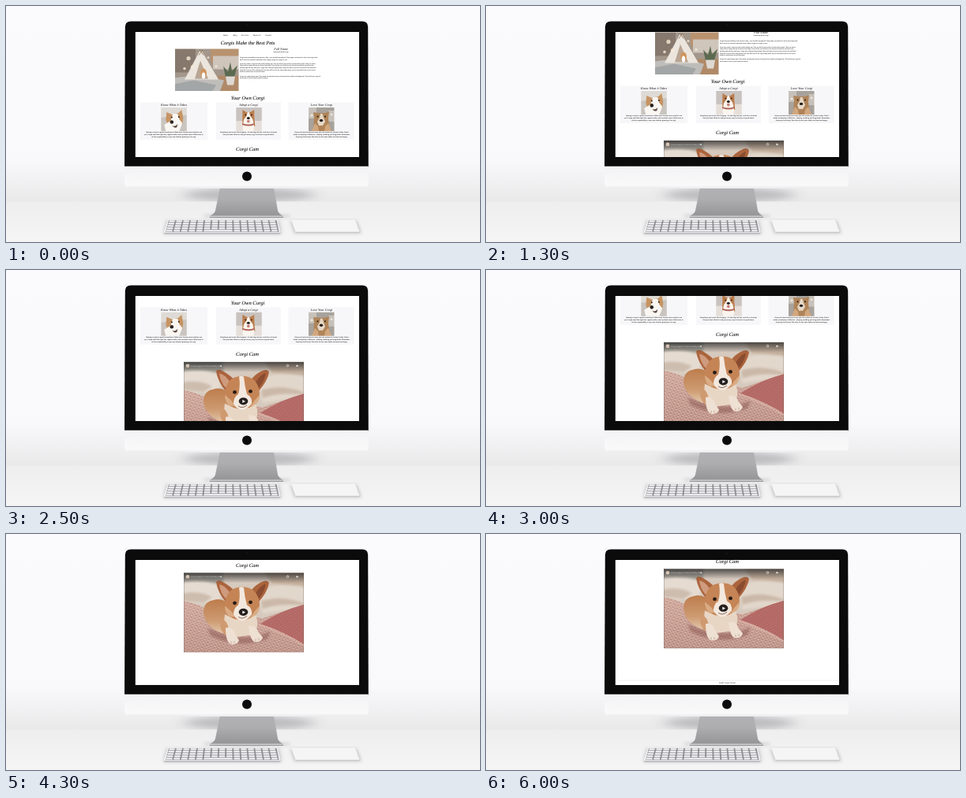
An HTML page that plays this animation: 600x300 px, repeating every 6100 ms.

```html
<!DOCTYPE html>
<html lang="en">
<head>
<meta charset="utf-8">
<title>Corgi page on a desktop screen</title>
<style>
html, body { margin: 0; width: 100%; height: 100%; overflow: hidden; background: #f8f8f9; }
svg { display: block; width: 600px; height: 300px; }
text { text-anchor: middle; text-rendering: geometricPrecision; fill: #151515; }
.serif { font-family: "Liberation Serif", serif; font-style: italic; }
.sans { font-family: "Open Sans", sans-serif; font-size: 1.75px; font-weight: 600; }
.card { font-size: 1.95px; }
.left { text-anchor: start; }
.h1 { font-size: 6.5px; stroke: #151515; stroke-width: .08px; }
.h2 { font-size: 4.15px; }
.nav { font-size: 2.6px; }
</style>
</head>
<body>
<svg viewBox="0 0 600 300" xmlns="http://www.w3.org/2000/svg">
  <defs>
    <linearGradient id="wall" x2="0" y2="1">
      <stop stop-color="#fbfafc"/><stop offset=".78" stop-color="#f9f8fa"/><stop offset="1" stop-color="#e9e9ea"/>
    </linearGradient>
    <linearGradient id="desk" x2="0" y2="1">
      <stop stop-color="#eeeeef"/><stop offset=".4" stop-color="#f1f1f2"/><stop offset="1" stop-color="#f5f5f6"/>
    </linearGradient>
    <linearGradient id="chin" x2="0" y2="1">
      <stop stop-color="#f3f3f5"/><stop offset=".85" stop-color="#f9f9fa"/><stop offset="1" stop-color="#eaeaec"/>
    </linearGradient>
    <linearGradient id="stand" x2="0" y2="1">
      <stop stop-color="#b2b2b4"/><stop offset=".4" stop-color="#adadb0"/><stop offset="1" stop-color="#939396"/>
    </linearGradient>
    <linearGradient id="bar" x2="0" y2="1">
      <stop stop-color="#2b2b2b" stop-opacity=".8"/><stop offset="1" stop-color="#2b2b2b" stop-opacity="0"/>
    </linearGradient>
    <linearGradient id="knit" x2="0" y2="1">
      <stop stop-color="#d3a99d"/><stop offset="1" stop-color="#b78a7f"/>
    </linearGradient>
    <linearGradient id="coat" x2="0" y2="1">
      <stop stop-color="#bd7d4d"/><stop offset=".6" stop-color="#cd9a70"/><stop offset="1" stop-color="#e3c7ac"/>
    </linearGradient>
    <pattern id="weave" width="5" height="4" patternUnits="userSpaceOnUse" patternTransform="rotate(18)">
      <path d="M0 1h3M2.5 3h2.5" stroke="#ead0c5" stroke-width="1"/>
      <path d="M0 2.2h3M2.5 4h2.5" stroke="#96645c" stroke-width=".5"/>
    </pattern>
    <pattern id="rib" width="3" height="3" patternUnits="userSpaceOnUse" patternTransform="rotate(-28)">
      <path d="M0 1h2" stroke="#c98581" stroke-width=".8"/>
    </pattern>
    <filter id="photo"><feGaussianBlur stdDeviation=".4"/></filter>
    <filter id="soft"><feGaussianBlur stdDeviation="1.6"/></filter>
    <filter id="blur" x="-30%" width="160%" y="-100%" height="300%"><feGaussianBlur stdDeviation="2"/></filter>
    <filter id="haze" x="-40%" width="180%" y="-150%" height="400%"><feGaussianBlur stdDeviation="10 4"/></filter>
    <clipPath id="wallBox"><path d="M0 0H600V248.5H0Z"/></clipPath>
    <clipPath id="screen"><path d="M163.8 33H447V192H163.8Z"/></clipPath>
    <clipPath id="heroBox"><path d="M0 0H80.5V53.5H0Z"/></clipPath>
    <clipPath id="thumb"><path d="M0 0H32.5V30H0Z"/></clipPath>
    <clipPath id="videoBox"><path d="M0 0H152V101H0Z"/></clipPath>
  </defs>

  <!-- Room -->
  <path fill="url(#wall)" d="M0 0H600V249H0Z"/>
  <path fill="url(#desk)" d="M0 248.5H600V300H0Z"/>
  <g clip-path="url(#wallBox)">
    <ellipse cx="308" cy="240" rx="82" ry="9" fill="#a3a3a6" opacity=".65" filter="url(#haze)"/>
  </g>
  <ellipse cx="305" cy="267" rx="56" ry="3" fill="#b5b5b8" opacity=".6" filter="url(#blur)"/>

  <!-- Computer -->
  <path fill="url(#stand)" d="M271 231H339L344 260Q345 264 351 267V268.5H258V267Q264 264 265 260Z"/>
  <path fill="#d9d9db" d="M258.5 266.8H350.5L351 268H258Z"/>
  <path fill="#8c8c8f" d="M258 268H351V269H258Z"/>
  <path fill="#0b0b0c" d="M158 19.6H451Q458 19.6 458.2 26.5L458.8 205H150L150.8 26.5Q151 19.6 158 19.6Z"/>
  <circle cx="304.5" cy="24.5" r=".7" fill="#2c2c30"/>
  <path fill="url(#chin)" d="M150 203.8H458.8V226Q458.8 232 453 232H156Q150 232 150 226Z"/>
  <circle cx="305" cy="216.5" r="6" fill="#0b0b0c"/>

  <!-- Keyboard and trackpad -->
  <path fill="#a9a9ad" opacity=".6" filter="url(#blur)" d="M203 273H346L349 290H199ZM360 273H444L450 289H365Z"/>
  <path fill="#b5b5b9" d="M205 271.5H343.5L347.5 289Q347.5 290 346 290H201.5Q200 290 200 289Z"/>
  <path fill="#f1f1f2" d="M205 271H343.5L347.5 287.5Q347.5 288.5 346 288.5H201.5Q200 288.5 200 287.5Z"/>
  <path fill="#8d8d92" d="M206 272.2H342.5L345.6 287.2H202.2Z"/>
  <g id="keys" fill="#fcfcfd"></g>
  <path fill="#cdcdd0" d="M361 272.5H442L448 288.5H367Z"/>
  <path fill="#f5f5f6" d="M361 272H442L447.5 287H366.5Z"/>

  <!-- Web page -->
  <g clip-path="url(#screen)">
    <path fill="#fff" d="M163 33H447V192H163Z"/>
    <g id="page">
      <path fill="#f7f7f9" d="M170 122.5H255V170H170ZM266 122.5H348V170H266ZM357.5 122.5H440.5V170H357.5Z"/>
      <g id="copy"></g>

      <g transform="translate(214 54.5)" clip-path="url(#heroBox)"><g filter="url(#photo)">
        <path fill="#a3968a" d="M-2 -2H83V56H-2Z"/>
        <path fill="#87786d" d="M-2 -2H26V30H-2Z"/>
        <path fill="#b8926f" d="M45 -2H83V17H45Z"/>
        <path fill="#cfc5bb" d="M48 9H83V26H48Z"/>
        <path fill="#b08a68" d="M54 34H83V56H54Z"/>
        <path fill="#bfbdba" d="M-2 37Q30 32 62 40L56 56H-2Z"/>
        <path fill="#ebe5dd" d="M31 3L34 3L55 39H12Z"/>
        <path fill="#b9a594" d="M32 15L42 38H25Z"/>
        <path d="M31 1L36 8M35 1L30 8" stroke="#8b6d52" stroke-width=".8"/>
        <ellipse cx="36" cy="31" rx="4" ry="6" fill="#cf965f"/>
        <ellipse cx="36" cy="34" rx="2.2" ry="4" fill="#fff"/>
        <path fill="#5a6a50" d="M64 36L61 22L67 29L70 17L72 28L79 21L75 36Z"/>
        <path fill="#dfd9d3" d="M64 35H76L74 46H66Z"/>
        <path fill="#a3a6a6" d="M-2 45L24 40L52 46L46 56H-2Z"/>
        <g fill="#f7ead7" opacity=".8">
          <circle cx="17" cy="12" r="2.6"/><circle cx="22" cy="23" r="2.3"/><circle cx="12" cy="25" r="1.8"/>
          <circle cx="42" cy="11" r="1.5"/><circle cx="52" cy="22" r="1.6"/>
        </g>
      </g></g>

      <g transform="translate(196.3 129)" clip-path="url(#thumb)"><g filter="url(#photo)">
        <path fill="#c9c4bf" d="M-2 -2H35V32H-2Z"/>
        <path fill="#dedad5" d="M-2 -2H35V9L-2 13Z"/>
        <path fill="#c69462" d="M6 16L7 6L14 9L22 7L26 3L28 13L27 22L10 25Z"/>
        <path fill="#faf7f3" d="M15 8L21 8L23 15L27 20L23 30H6L4 22L12 17Z"/>
        <circle cx="13.5" cy="18.5" r="2.3" fill="#2a211d"/>
        <circle cx="13.5" cy="12.5" r="1" fill="#2a211d"/><circle cx="22.5" cy="12" r="1" fill="#2a211d"/>
        <path fill="#55433a" d="M14 23Q18 25 21 21L20 25Q17 27 14 23Z"/>
      </g></g>

      <g transform="translate(291.3 129)" clip-path="url(#thumb)"><g filter="url(#photo)">
        <path fill="#c9c3c0" d="M-2 -2H35V32H-2Z"/>
        <path fill="#e6dfd9" d="M-2 17H35V32H-2Z"/>
        <path fill="#bb7d4c" d="M8 11L8 3L13 6H18L23 3L23 12L24 24H8Z"/>
        <path fill="#faf5ef" d="M14.5 6H16.5L18 11L21 15L23 24L22 30H9L8 24L10 15L13 11Z"/>
        <path fill="#b0655a" d="M8 20Q16 23 23 20V22Q16 25 8 22Z"/>
        <ellipse cx="15.5" cy="13.5" rx="2" ry="1.5" fill="#211a18"/>
        <circle cx="12" cy="9.5" r=".9" fill="#211a18"/><circle cx="19.5" cy="9.5" r=".9" fill="#211a18"/>
        <ellipse cx="15.5" cy="17.5" rx="1.8" ry="2" fill="#c9817a"/>
      </g></g>

      <g transform="translate(383 129)" clip-path="url(#thumb)"><g filter="url(#photo)">
        <path fill="#a7a29c" d="M-2 -2H35V32H-2Z"/>
        <path fill="#c6c1ba" d="M-2 -2H10V14H-2ZM25 4H35V18H25Z"/>
        <path fill="#b08458" d="M7 12L6 6L12 7H21L26 5L25 14L27 30H6Z"/>
        <path fill="#e6d8c6" d="M15 8H17.5L19 13L21 18L18 23H13L11 18L14 13Z"/>
        <path fill="#d2a77e" d="M4 30L8 20L12 24L13 30ZM20 30L21 24L25 20L29 30Z"/>
        <ellipse cx="16" cy="16.5" rx="2.2" ry="1.7" fill="#211a18"/>
        <circle cx="11.5" cy="11.5" r="1" fill="#211a18"/><circle cx="21" cy="11.5" r="1" fill="#211a18"/>
        <circle cx="4" cy="10" r="1.5" fill="#f3e9da"/><circle cx="29" cy="9" r="1.3" fill="#f3e9da"/>
      </g></g>

      <g transform="translate(225 192)" clip-path="url(#videoBox)">
        <g filter="url(#photo)">
          <path fill="#d6c9bd" d="M-2 -2H154V103H-2Z"/>
          <g filter="url(#soft)">
            <path fill="#a7a39a" d="M-4 -4H50V14H-4Z"/>
            <path fill="#e5dbd1" d="M-4 13Q25 7 48 17L45 40L-4 38Z"/>
            <path fill="#cdbdae" d="M-4 27Q18 21 36 31L26 38L-4 36Z"/>
            <path fill="#e2d7cb" d="M92 24Q120 9 156 20V44L100 52Z"/>
            <path fill="#c2ad9a" d="M100 -4H156V17L112 14Z"/>
            <path fill="#cbb8a8" d="M98 36Q122 28 150 38L154 42Q120 38 100 46Z"/>
          </g>
          <path fill="url(#knit)" d="M-2 36Q14 38 26 45L100 58L154 40V103H-2Z"/>
          <path fill="url(#weave)" d="M-2 36Q14 38 26 45L100 58L154 40V103H-2Z"/>
          <path fill="#7f4c46" opacity=".45" filter="url(#soft)" d="M30 70Q75 92 110 74L106 84Q70 98 34 80Z"/>
          <path fill="#b06561" d="M97 65Q122 48 154 40V92Q128 75 97 65Z"/>
          <path fill="url(#rib)" d="M97 65Q122 48 154 40V92Q128 75 97 65Z"/>
          <path d="M95 66Q128 77 154 94" fill="none" stroke="#dcb2a7" stroke-width="2.5" stroke-dasharray="2 1"/>

          <path fill="url(#coat)" d="M25 50Q25 37 37 35Q52 30 60 45L68 74L52 78Q27 70 25 50Z"/>
          <path fill="#e8d6c4" d="M52 53Q72 64 91 53Q97 70 87 79L64 82Q48 77 52 53Z"/>
          <path fill="#cf9a70" d="M47 58Q55 60 57 72L54 80Q44 74 47 58Z"/>
          <path fill="#eee0d3" d="M53 70Q62 68 65 78L70 86Q68 92 60 91Q53 89 53 70Z"/>
          <path fill="#eee0d3" d="M82 68Q92 66 94 75L100 82Q98 89 90 88Q84 86 82 68Z"/>
          <path d="M60 87v3M64 87v3M91 84v3M95 83v3" stroke="#b69482" stroke-width=".7"/>

          <path fill="#ab643d" d="M41 12Q43 8 50 12Q59 17 65 24L53 37Q43 25 41 12Z"/>
          <path fill="#cf9b7e" d="M45 15Q51 15 59 26L53 33Q46 25 45 15Z"/>
          <path fill="#ab643d" d="M108 13Q106 8 98 12Q90 16 85 23L94 38Q106 25 108 13Z"/>
          <path fill="#8a4c30" d="M104 14Q97 16 91 26L95 33Q102 25 104 14Z"/>
          <path fill="#c58455" d="M54 31Q58 19 73 18Q89 18 94 31Q99 45 91 53Q83 60 74 60Q62 60 55 53Q49 43 54 31Z"/>
          <path fill="#d9ac85" d="M52 42Q60 48 66 56L58 56Q52 51 52 42ZM96 42Q90 48 84 57L91 54Q96 50 96 42Z"/>
          <path fill="#f3e8de" d="M70 19Q73 17 76 19Q77 31 80 41Q87 45 86 53Q80 61 74 61Q66 60 63 53Q63 45 69 41Q72 31 70 19Z"/>
          <ellipse cx="64.5" cy="38.5" rx="2.4" ry="2.3" fill="#271a15"/>
          <ellipse cx="84.5" cy="37.5" rx="2.4" ry="2.3" fill="#271a15"/>
          <path d="M69 56Q74 60 80 55" fill="none" stroke="#7b5548" stroke-width=".9"/>
        </g>
        <ellipse cx="75.5" cy="50" rx="5.8" ry="4.6" fill="#251f1e"/>
        <path fill="#fff" d="M74.3 48.2L78 50.2L74.3 52.2Z"/>

        <path fill="url(#bar)" d="M0 0H152V13H0Z"/>
        <circle cx="5" cy="5" r="2.3" fill="#d9c4b3"/>
        <text class="sans left" x="9" y="5.9" style="font-size:2.5px;fill:#bbb">Corgi puppy at home all day long</text>
        <circle cx="47" cy="5" r=".9" fill="#ddd"/>
        <circle cx="131.5" cy="4.8" r="1.3" fill="none" stroke="#eee" stroke-width=".7"/>
        <path fill="#eee" d="M142.5 3.6L145.5 5L142.5 6.4Z"/>
        <path fill="none" stroke="#57453e" stroke-opacity=".5" d="M0 0V101H152V0"/>
      </g>
      <path fill="#e9e9eb" d="M168 333.5H446V334.2H168Z"/>
    </g>
  </g>
</svg>
<script>
const NS = "http://www.w3.org/2000/svg";
const $ = id => document.getElementById(id);

function add(parent, tag, attrs, content = "") {
  const el = document.createElementNS(NS, tag);
  for (const k in attrs) el.setAttribute(k, attrs[k]);
  el.textContent = content;
  parent.append(el);
}

const write = (cls, x, y, str) => add($("copy"), "text", { class: cls, x, y }, str);
const lines = (cls, x, y, gap, list) => list.forEach((s, i) => write(cls, x, y + i * gap, s));

[["Home", 278], ["Blog", 290], ["Pet Care", 302.5], ["About Us", 317.5], ["Contact", 332]]
  .forEach(([s, x]) => write("serif nav", x, 38, s));

write("serif h1", 306, 48.6, "Corgis Make the Best Pets");
write("serif h1", 306, 119.2, "Your Own Corgi");
write("serif h1", 305.5, 184.4, "Corgi Cam");
write("serif h2", 348, 56, "Full Name");
write("sans", 348, 59.4, "Pembroke Welsh Corgi");
write("serif nav", 305.5, 337.6, "Small Corgis Travel");

lines("sans left", 296, 66, 2.65, [
  "Corgis have personality, from sweet to silly – you should be prepared. These dogs are known for their short legs, their",
  "fluff, and of course their adorable faces! Happy corgis are a sight to see."
]);
lines("sans left", 296, 73.8, 2.65, [
  "Once they settle, corgis are the perfect family pet. They are full of joy and love to play with people. They are smart",
  "They love to sleep and run around on little legs. They can be a lot of work, but they are worth the time and care.",
  "herding and will stay with you. Corgis also need good grooming. They shed twice a year and need a brush and bath",
  "each day. They are fine and patient, but they will not ask for a good day alone, so you can take them on all of your",
  "walks or adventures around the town."
]);
lines("sans left", 296, 89.6, 2.65, [
  "Corgis can make happy pets. They need a moderate amount of exercise for health and happiness. This will keep a corgi fit",
  "and ready to live for years with the family."
]);

const cards = [
  [212.5, "Know What it Takes", [
    "Owning a corgi is a great commitment. Make sure that you are ready for one",
    "pet. Corgis need the right diet, regular walks, and a patient owner. Make sure to",
    "do the responsibility, so you can take the great joy of a corgi."]],
  [307, "Adopt a Corgi", [
    "Adopting a pet can be life changing – for the dog and you. Look for a local pet",
    "that you have fallen for and give every corgi a chance at a good home."]],
  [399.5, "Love Your Corgi", [
    "Once you have found your corgi, you can make sure to love it daily. Give it",
    "walks, and plenty of affection – playing, cuddling, and long walks. Remember",
    "they may feel lonely. Take time to rest and cuddle, and see how happy."]]
];
for (const [x, head, body] of cards) {
  write("serif h2", x, 127.4, head);
  lines("sans card", x, 161.2, 2.8, body);
}

// Key rows spread towards the viewer; the last one holds the space bar
for (let row = 0; row < 5; row++) {
  const y = 272.4 + row * 3, left = 206.4 - row * 0.9;
  const pitch = (342.6 + row * 0.75 - left) / 15;
  for (let i = 0; i < 15; i++) {
    const span = row === 4 && i === 5 ? 4 : 1;
    add($("keys"), "rect", { x: left + i * pitch, y, width: span * pitch - 1.7, height: 2.1, rx: 0.5 });
    i += span - 1;
  }
}

const LOOP = 6100, STEP = 100, GLIDE = 4950, DEPTH = 147.8;

// Ease-in-out: cubic Bézier (.42, 0, .58, 1), solved by bisection
function ease(x) {
  let lo = 0, hi = 1, u = x;
  for (let i = 0; i < 24; i++) {
    u = (lo + hi) / 2;
    const at = 3 * u * (1 - u) * (0.42 * (1 - u) + 0.58 * u) + u ** 3;
    if (at < x) lo = u; else hi = u;
  }
  return u * u * (3 - 2 * u);
}

const start = performance.now();
function draw() {
  const t = Math.max(0, performance.now() - start) % LOOP;
  const step = Math.floor(t / STEP) * STEP;
  const y = DEPTH * ease(Math.min(1, step / GLIDE));
  $("page").setAttribute("transform", `translate(0 ${-y.toFixed(2)})`);
  requestAnimationFrame(draw);
}
draw();
</script>
</body>
</html>
```
